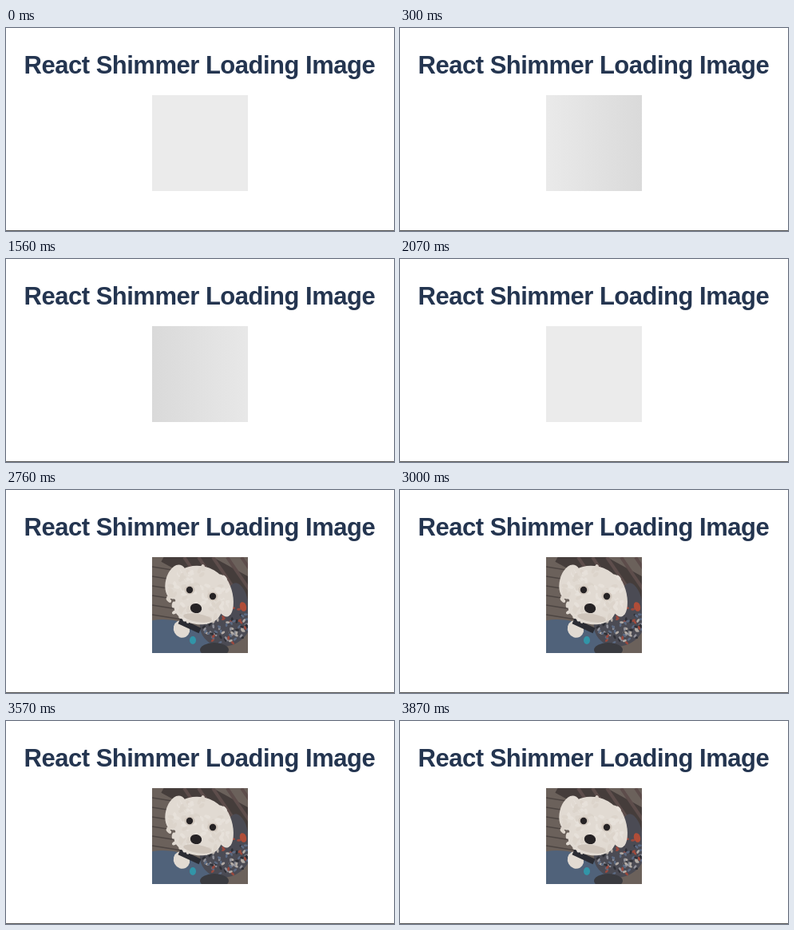
An HTML page with a canvas that plays this animation: 486x254 px, repeating every 3900 ms.

```html
<!DOCTYPE html>
<html lang="en">
<head>
<meta charset="utf-8">
<title>React Shimmer Loading Image</title>
<style>
  html, body { margin: 0; width: 100%; height: 100%; overflow: hidden; background: #fff; }
  canvas { display: block; width: 486px; height: 254px; }
</style>
</head>
<body>
<canvas id="stage" width="486" height="254"></canvas>
<script>
const ctx = document.getElementById('stage').getContext('2d');
const LOOP = 3900, LOADED = 2760, SWEEP_START = 1420, SWEEP = 750;
const LEFT = 183, TOP = 84, SIZE = 120;
const BASE = 235, DEPTH = 18, LEAD = 150, TAIL = 135;

const gray = v => `rgb(${v},${v},${v})`;

function oval(color, x, y, rx, ry = rx, turn = 0) {
  ctx.fillStyle = color;
  ctx.beginPath();
  ctx.ellipse(x, y, rx, ry, turn, 0, Math.PI * 2);
  ctx.fill();
}

function line(color, width, x1, y1, x2, y2) {
  ctx.strokeStyle = color;
  ctx.lineWidth = width;
  ctx.beginPath();
  ctx.moveTo(x1, y1);
  ctx.lineTo(x2, y2);
  ctx.stroke();
}

function seeded(seed) {
  return () => (seed = seed * 16807 % 2147483647) / 2147483647;
}

// Small ovals spread at random over an ellipse.
function scatter(rand, colors, count, cx, cy, rx, ry, size) {
  for (let i = 0; i < count; i++) {
    const a = rand() * Math.PI * 2, r = Math.sqrt(rand());
    const x = cx + rx * r * Math.cos(a), y = cy + ry * r * Math.sin(a);
    oval(colors[i % colors.length], x, y, size, size * 0.55, rand() * Math.PI);
  }
}

// The dark band enters fast from the left and slows down on its way out.
function drawShimmer(t) {
  const age = t < SWEEP_START ? t : t - SWEEP_START;
  const rest = 1 - Math.min(age / SWEEP, 1);
  const peak = -LEAD + 430 * (1 - rest * rest);
  const g = ctx.createLinearGradient(peak - TAIL, 0, peak + LEAD, 0);
  g.addColorStop(0, gray(BASE));
  g.addColorStop(TAIL / (TAIL + LEAD), gray(BASE - DEPTH));
  g.addColorStop(1, gray(BASE));
  ctx.fillStyle = g;
  ctx.fillRect(0, 0, SIZE, SIZE);
}

function drawPhoto() {
  const rand = seeded(29);
  const fur = '#e1dad2', shade = '#cfc5bb', dark = '#262325';

  // deck and bench
  ctx.fillStyle = '#6b615b';
  ctx.fillRect(0, 0, SIZE, SIZE);
  for (let y = 12; y < 90; y += 12) line('#4d4542', 1.5, 0, y, 50, y + 8);
  line('#453d3b', 36, 20, -10, 130, 50);
  for (let x = 40; x < 120; x += 18) line('#5d4d4b', 4, x, 0, x + 30, 44);

  // jeans, shirt and collar
  oval('#50627a', 28, 118, 62, 38, 0.25);
  oval('#4b4b54', 92, 82, 33, 29, -0.5);
  oval('#4b4b54', 108, 56, 12, 24, -0.2);
  scatter(rand, ['#8e8f98', '#2f3037', '#9b4a3e', '#b3aca6', '#5c6a82'], 90, 92, 84, 29, 25, 2.6);
  oval('#b04d38', 114, 62, 4, 6, -0.3);
  oval('#3a3b40', 78, 116, 18, 9);
  oval(fur, 37, 90, 10, 11, -0.5);
  line('#2b2c33', 7, 34, 80, 60, 92);
  oval('#3295a8', 51, 104, 4, 5);

  // head with ragged fur
  oval(fur, 30, 31, 13, 22, 0.25);
  oval(fur, 89, 48, 12, 27, -0.2);
  oval(fur, 59, 40, 36, 29, 0.2);
  oval(fur, 57, 64, 30, 20, 0.15);
  scatter(rand, [fur, '#e7e1da', '#dcd4cb'], 130, 58, 47, 41, 35, 4);
  oval(shade, 57, 76, 18, 5, 0.15);

  for (const [x, y] of [[47, 41], [76, 49]]) {
    oval(shade, x, y, 6.5, 5.5);
    oval(dark, x, y, 4.2);
  }
  oval(dark, 55, 64, 7.2, 6, 0.2);
}

function frame(t) {
  ctx.fillStyle = '#fff';
  ctx.fillRect(0, 0, 486, 254);

  ctx.fillStyle = '#243550';
  ctx.font = 'bold 31px "Liberation Sans", Arial, sans-serif';
  ctx.letterSpacing = '-0.5px';
  ctx.fillText('React Shimmer Loading Image', 22.6, 57);

  ctx.fillStyle = '#555';
  ctx.fillRect(0, 253, 486, 1);

  ctx.save();
  ctx.translate(LEFT, TOP);
  ctx.beginPath();
  ctx.rect(0, 0, SIZE, SIZE);
  ctx.clip();
  if (t < LOADED) drawShimmer(t);
  else drawPhoto();
  ctx.restore();
}

const start = performance.now();
function tick() {
  frame((performance.now() - start) % LOOP);
  requestAnimationFrame(tick);
}
tick();
</script>
</body>
</html>
```
